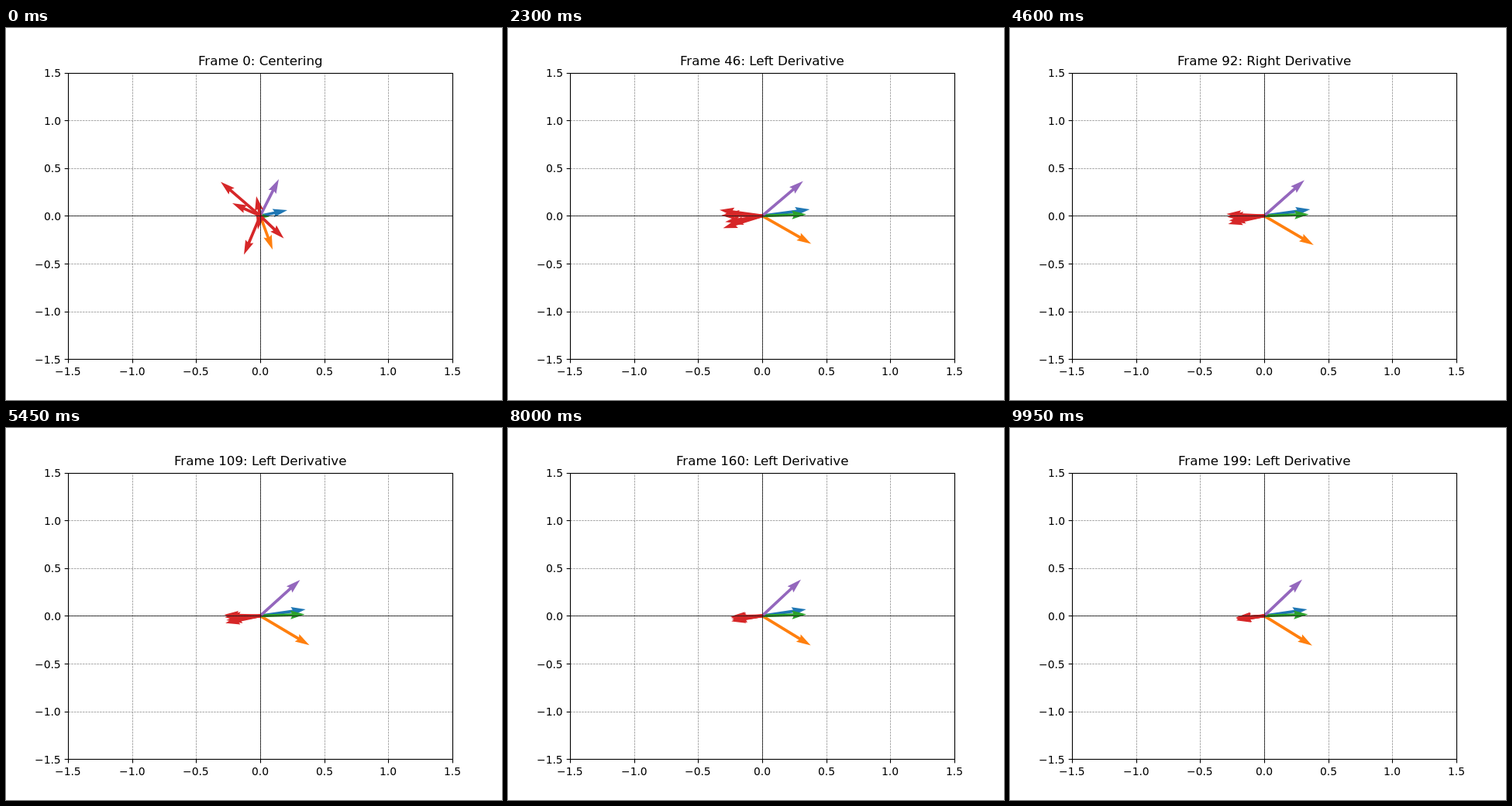
Write an HTML page with a canvas that moves like this. It is 640 by 480 pixels and loops after 10 s.

```html
<!DOCTYPE html>
<html>
<head>
<meta charset="utf-8">
<style>
html, body { margin: 0; width: 100%; height: 100%; overflow: hidden; background: #fff; }
canvas { display: block; }
</style>
</head>
<body>
<canvas id="stage" width="640" height="480"></canvas>
<script>
const ctx = document.getElementById('stage').getContext('2d');
const LEFT = 80, TOP = 57.6, WIDTH = 496, HEIGHT = 369.6;
const RIGHT = LEFT + WIDTH, BOTTOM = TOP + HEIGHT;
const CX = LEFT + WIDTH / 2, CY = TOP + HEIGHT / 2;
const PT = 100 / 72, SHAFT = 0.0075 * WIDTH;
const STEP_MS = 50, STEPS = 200;
const PHASES = ['Centering', 'Left Derivative', 'Right Derivative'];
const RED = '#d62728';

// Each tip settles from start to rest, swings out once and drifts slowly in x
const arrows = [
  { color: '#1f77b4', start: [363, 235], rest: [389.5, 234], swing: [2.5, 0], drift: -0.03 },
  { color: '#ff7f0e', start: [344, 286], rest: [393.5, 280.7], swing: [0, -3], drift: -0.018 },
  { color: '#2ca02c', start: [340, 243.5], rest: [386.8, 240.5], swing: [0, 0], drift: -0.011 },
  { color: '#9467bd', start: [352, 195], rest: [382, 195.5], swing: [1, 2.5], drift: -0.025 },
];

// The red tips gather around one moving centre
const redCentre = { start: [313.4, 244.3], rest: [273, 246.3], swing: [0, 0], drift: 0.096 };
const redStarts = [[277, 198.5], [292, 226], [307, 292.5], [358.5, 271.5], [323, 217], [325, 260]];

const decay = (step, time) => Math.exp(-step / time);
const spread = (step, slowShare) => slowShare * decay(step, 90) + (1 - slowShare) * decay(step, 14);

function tipAt({ start, rest, swing, drift }, step) {
  const unsettled = decay(step, 13), bump = step / 25 * Math.exp(1 - step / 25);
  const [x, y] = rest.map((r, i) => r + (start[i] - r) * unsettled + swing[i] * bump);
  return [x + drift * step * (1 - unsettled), y];
}

function arrow(color, [x, y]) {
  const dx = x - CX, dy = y - CY, length = Math.hypot(dx, dy);
  const s = SHAFT * Math.min(1, length / (5 * SHAFT));
  const neck = length - 4.5 * s, barb = length - 5 * s;
  ctx.save();
  ctx.translate(CX, CY);
  ctx.rotate(Math.atan2(dy, dx));
  ctx.beginPath();
  for (const [px, py] of [[0, -0.5], [neck, -0.5], [barb, -1.5], [length, 0], [barb, 1.5], [neck, 0.5], [0, 0.5]])
    ctx.lineTo(px, py * s);
  ctx.fillStyle = color;
  ctx.fill();
  ctx.restore();
}

function drawArrows(step) {
  for (const a of arrows) arrow(a.color, tipAt(a, step));
  const [mx, my] = tipAt(redCentre, step), [sx, sy] = redCentre.start;
  for (const [x, y] of redStarts)
    arrow(RED, [mx + (x - sx) * spread(step, 0.2), my + (y - sy) * spread(step, 0.38)]);
  ctx.beginPath();
  ctx.arc(CX, CY, SHAFT / 2, 0, 2 * Math.PI);
  ctx.fillStyle = RED;
  ctx.fill();
}

function line(x1, y1, x2, y2, width, color = '#000', dash = []) {
  ctx.lineWidth = width;
  ctx.strokeStyle = color;
  ctx.setLineDash(dash);
  ctx.beginPath();
  ctx.moveTo(x1, y1);
  ctx.lineTo(x2, y2);
  ctx.stroke();
}

// anchor: 0.5 centres the text on x, 1 ends it there
function text(string, x, y, points, anchor) {
  ctx.font = `${points * PT}px "DejaVu Sans", sans-serif`;
  ctx.fillStyle = '#000';
  ctx.fillText(string, Math.round(x - ctx.measureText(string).width * anchor), Math.round(y));
}

const snap = v => Math.round(v) + 0.5;

function drawAxes() {
  const left = snap(LEFT), right = snap(RIGHT), top = snap(TOP), bottom = snap(BOTTOM);
  const thin = 0.5 * PT, frame = 0.8 * PT, tick = 3.5 * PT;
  const dash = [3.7 * thin, 1.6 * thin];
  for (let i = 0; i <= 6; i++) {
    const x = LEFT + WIDTH * i / 6, y = BOTTOM - HEIGHT * i / 6;
    const value = i / 2 - 1.5;
    const label = (value < 0 ? '\u2212' : '') + Math.abs(value).toFixed(1);
    line(snap(x), bottom, snap(x), top, thin, '#808080', dash);
    line(left, snap(y), right, snap(y), thin, '#808080', dash);
    line(snap(x), bottom, snap(x), bottom + tick, frame);
    line(left, snap(y), left - tick, snap(y), frame);
    text(label, x, 448, 10, 0.5);
    text(label, 71, y + 5.6, 10, 1);
  }
  line(left, snap(CY), right, snap(CY), thin);
  line(snap(CX), top, snap(CX), bottom, thin);
  ctx.lineWidth = frame;
  ctx.strokeRect(left, top, right - left, bottom - top);
}

function draw(step) {
  ctx.fillStyle = '#fff';
  ctx.fillRect(0, 0, 640, 480);
  drawArrows(step);
  drawAxes();
  text(`Frame ${step}: ${PHASES[step % 3]}`, CX, 48, 12, 0.5);
}

const start = performance.now();
function tick() {
  draw(Math.floor((performance.now() - start) / STEP_MS) % STEPS);
  requestAnimationFrame(tick);
}
tick();
</script>
</body>
</html>
```
